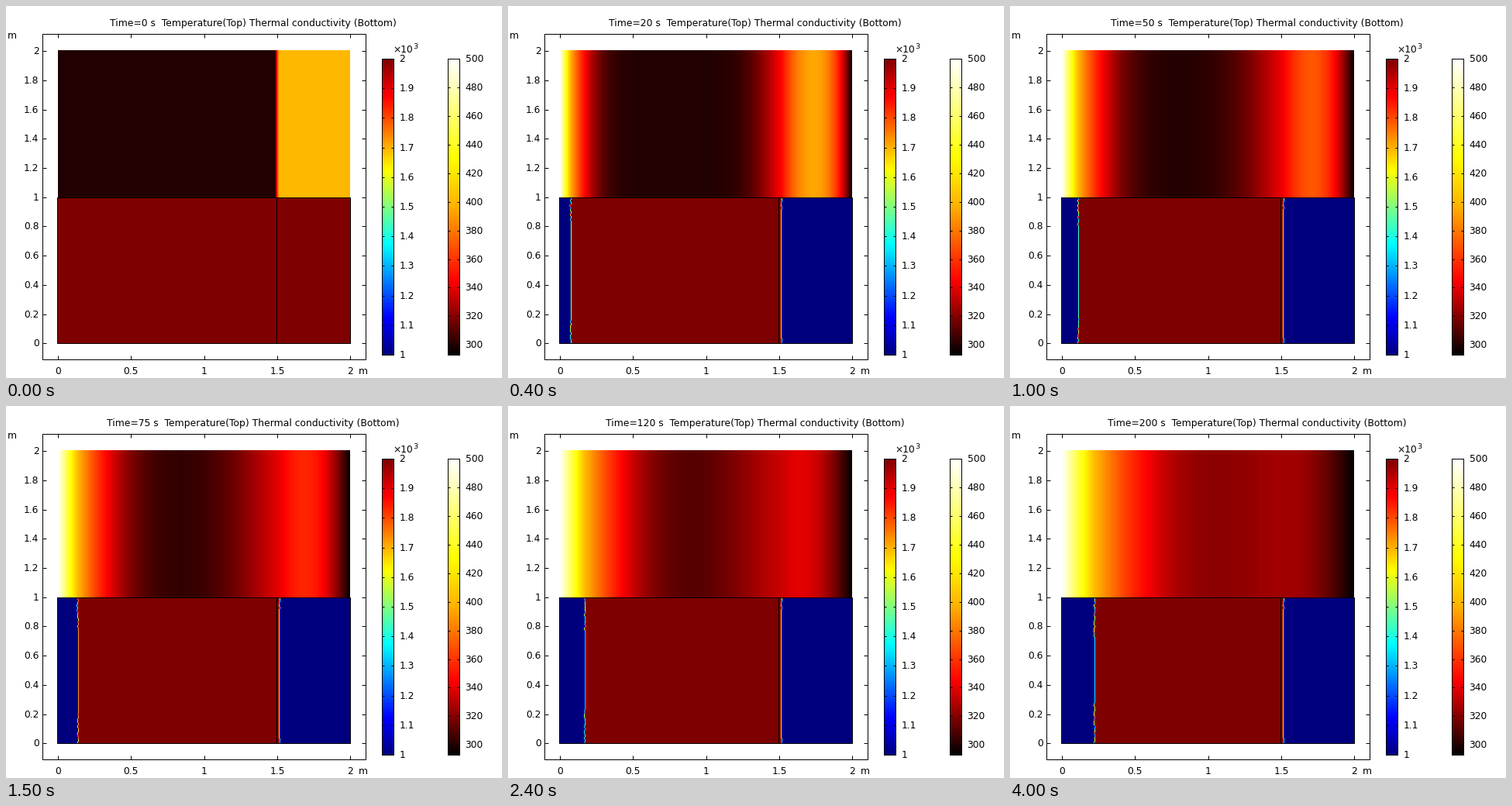
Animation, 640 px wide and 480 px high, one loop 4100 ms. Source, as a matplotlib script:

```python
import numpy as np
import matplotlib.pyplot as plt
from matplotlib.animation import FuncAnimation
from matplotlib.colors import LinearSegmentedColormap

FRAMES, INTERVAL = 41, 100
SECONDS = 5                      # simulated time per frame
T_SINK, T_START, T_WARM, T_HOT = 293.15, 300, 400, 500
K_LOW, K_HIGH = 1000, 2000
HEAT_CAP = 2.75e6                # density times specific heat
LEFT, RIGHT, TOP, MID, BOTTOM = 67, 444, 57, 247, 436
SCALE = 188.6                    # pixels per metre

thermal = LinearSegmentedColormap.from_list(
    "thermal", [(0, "black"), (0.25, "red"), (0.5, (1, 0.69, 0)),
                (0.667, "yellow"), (1, "white")])
rainbow = LinearSegmentedColormap.from_list(
    "rainbow", [(0, (0, 0, 0.5)), (0.125, "blue"), (0.375, "cyan"),
                (0.625, "yellow"), (0.875, "red"), (1, (0.5, 0, 0))])


def simulate():
    """Heat flow in a bar whose conductivity halves for good once it is hot."""
    x = np.linspace(0, 2, 401)
    dx, steps = x[1] - x[0], 400
    rate = SECONDS / steps / (HEAT_CAP * dx * dx)
    temp = np.interp(x, [1.485, 1.513], [T_START, T_WARM])
    worn = np.zeros(x.size, bool)
    fields = [temp.copy()]
    for _ in range(FRAMES - 1):
        for _ in range(steps):
            worn |= temp >= T_WARM - 0.1
            k = np.where(worn, K_LOW, K_HIGH)
            flux = 0.5 * (k[1:] + k[:-1]) * np.diff(temp)
            temp[1:-1] += rate * np.diff(flux)
            temp[0], temp[-1] = T_HOT, T_SINK
        fields.append(temp.copy())
    return x, fields


grid, fields = simulate()
cols = np.arange(LEFT, RIGHT) + 0.5
rows = 1 - (np.arange(BOTTOM - MID) + 0.5) / (BOTTOM - MID)


def wobble(seed, low, high, size):
    """Ragged offsets near the lower and upper ends of a front."""
    rng = np.random.default_rng(seed)
    jag = np.repeat(rng.uniform(-size, size, rows.size // 3), 3)
    shift = rng.choice([-0.7, 0.7]) * size
    return np.where((rows < low) | (rows > high), jag + shift, 0)


def temperature_image(i):
    temp = np.interp((cols - LEFT) / SCALE, grid, fields[i])
    return thermal((temp - T_SINK) / (T_HOT - T_SINK))[None, :, :3]


def conductivity_image(i):
    if i == 0:
        level = np.ones((rows.size, cols.size))
    else:
        t = i * SECONDS
        near = grid < 0.7
        front = np.interp(-T_WARM, -fields[i][near], grid[near])
        front += 0.008 * np.exp(-t / 40)
        zone = 0.16 + 0.0006 * t
        left = LEFT + front * SCALE + wobble(i, zone, 1 - zone, 0.9)
        right = 352.74 + wobble(100, 0.035, 0.92, 0.7)
        width = 1.6
        rise = (cols - left[:, None]) / width + 0.5
        fall = (right[:, None] - cols) / width + 0.5
        level = np.clip(np.minimum(rise, fall), 0, 1)
    return rainbow(level)[..., :3]


fig = plt.figure(figsize=(6.4, 4.8), dpi=100, facecolor="white")
ax = fig.add_axes([0, 0, 1, 1])
ax.axis("off")


def picture(data, x0, x1, y0, y1):
    return ax.imshow(data, extent=(x0, x1, y1, y0), aspect="auto",
                     interpolation="nearest", zorder=1)


def line(xs, ys):
    """One-pixel line; snapping fills the pixels named by xs and ys."""
    ax.plot(xs, ys, color="black", lw=0.72, snap=True,
            solid_capstyle="butt", solid_joinstyle="miter", zorder=3)


def box(x0, y0, x1, y1):
    line([x0, x1, x1, x0, x0], [y0, y0, y1, y1, y0])


def label(x, y, text, ha="center", size=12.2):
    """Place text with its digits centred on height y."""
    return ax.text(x, y + 4, text, ha=ha, va="baseline",
                   fontsize=size * 0.72, family="DejaVu Sans", zorder=4)


def colorbar(x, cmap, low, high, ticks):
    picture(cmap(np.linspace(1, 0, 383))[:, None, :3], x, x + 16, 68, 451)
    box(x, 68, x + 15, 450)
    for value in ticks:
        y = 68 + 382 * (high - value) / (high - low)
        line([x, x + 3], [round(y)] * 2)
        line([x + 12, x + 15], [round(y)] * 2)
        label(x + 22.5, y, f"{value:g}", "left")


top = picture(temperature_image(0), LEFT, RIGHT, TOP, MID)
base = picture(conductivity_image(0), LEFT, RIGHT, MID, BOTTOM)
box(LEFT - 1, MID, RIGHT, BOTTOM - 1)
line([349, 349], [MID, BOTTOM - 1])

# plot frame with inward ticks
box(47, 36, 464, 456)
for n in range(11):
    y = round(435.3 - n * 0.2 * SCALE)
    line([47, 52], [y, y])
    line([459, 464], [y, y])
    label(42.5, y, f"{n * 0.2:.2g}", "right")
for n in range(5):
    x = round(LEFT + n * 0.5 * SCALE)
    line([x, x], [36, 41])
    line([x, x], [451, 456])
    label(x, 471, f"{n * 0.5:g}")
label(2, 38, "m", "left")
label(454.5, 471, "m", "left")

colorbar(485, rainbow, 1, 2, np.linspace(1, 2, 11))
colorbar(570, thermal, T_SINK, T_HOT, range(300, 501, 20))
label(499, 56, "×10", "left")
label(525, 51, "3", "left", 9.5)
title = label(318.5, 22, "", size=12.37)

ax.set_xlim(0, 640)
ax.set_ylim(480, 0)


def update(i):
    title.set_text(f"Time={i * SECONDS} s  Temperature(Top) "
                   "Thermal conductivity (Bottom)")
    top.set_data(temperature_image(i))
    base.set_data(conductivity_image(i))
    return title, top, base


anim = FuncAnimation(fig, update, frames=FRAMES, interval=INTERVAL,
                     repeat=True, repeat_delay=0)
plt.show()
```
